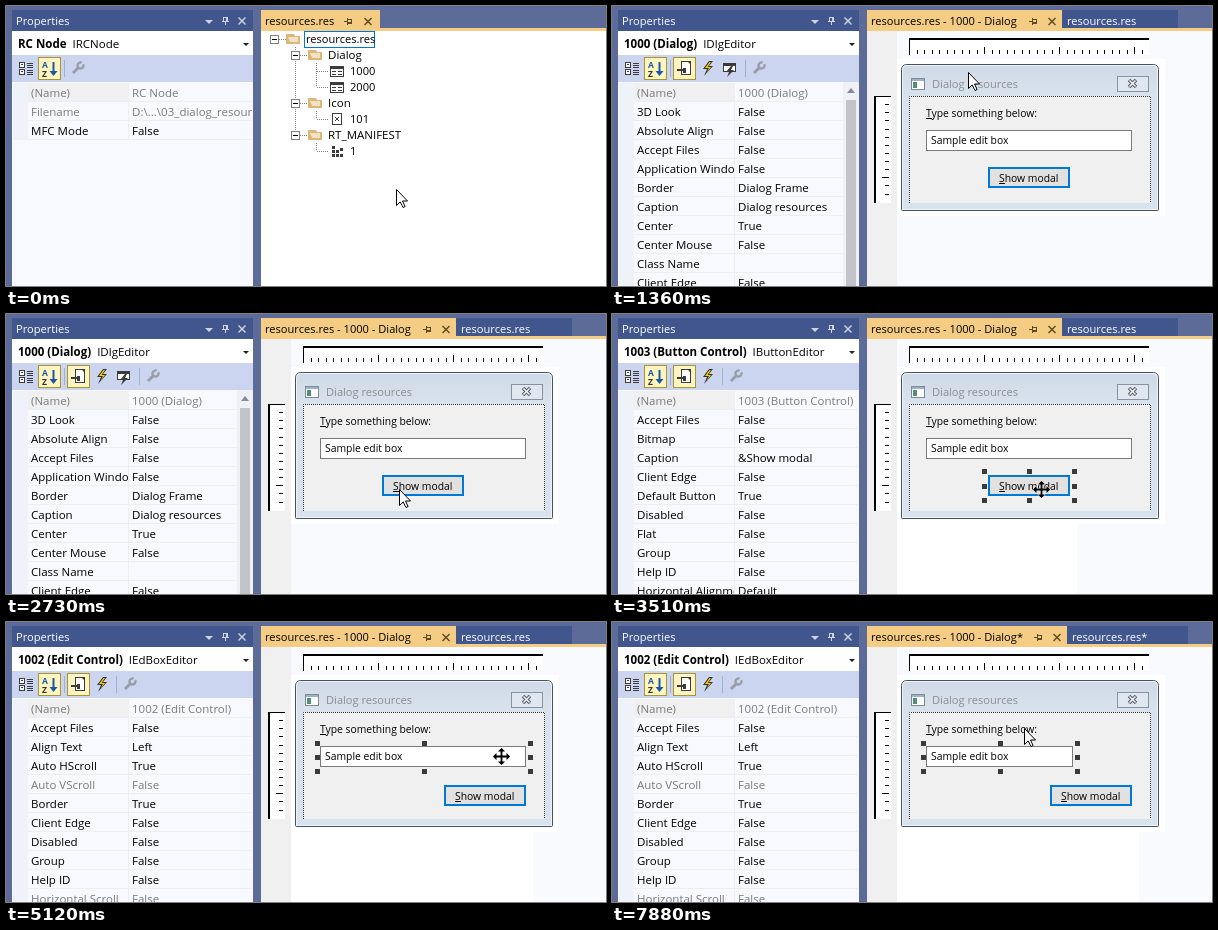
An HTML page with a canvas that plays this animation: 600 px wide and 280 px high, repeating every 8 s.

```html
<!DOCTYPE html>
<html lang="en">
<head>
<meta charset="utf-8">
<title>Dialog editor demo</title>
<style>
html, body { margin: 0; width: 100%; height: 100%; overflow: hidden; background: #5d6b99; }
canvas { display: block; }
</style>
</head>
<body>
<canvas id="stage" width="600" height="280"></canvas>
<script>
const ctx = document.getElementById('stage').getContext('2d');
const LOOP = 8000;
const UI = 11.5, TAB = 11.1, DLG = 10.35;
const BLUE = '#0078d7', NAVY = '#40568d', GOLD = '#f5cc84', DARK = '#3b3b3b';
const GRID = '#f7f9fe', GRID_LINE = '#eceef6', GUTTER = '#f0f2f9';

// Moments at which the interface state switches.
const PICK_NODE = 1090, OPEN_EDITOR = 1360, PICK_BUTTON = 2740, DROP_BUTTON = 4200;
const PICK_EDIT = 4900, AT_EDGE = 6510, DROP_EDGE = 7600;

const PANELS = {
  root: {
    name: 'RC Node', type: 'IRCNode', tools: 'short',
    rows: ['-(Name)|RC Node', '-Filename|D:\\...\\03_dialog_resources', 'MFC Mode|False']
  },
  node: {
    name: 'Dialog Node', type: 'IDlgRes', tools: 'short', wrench: '#333',
    rows: ['-(Name)|Dialog Node', '-Condition|', 'ID|1000', 'Language|English (United States)']
  },
  dialog: {
    name: '1000 (Dialog)', type: 'IDlgEditor', tools: 'full', scrolls: true,
    rows: ['-(Name)|1000 (Dialog)', '3D Look|False', 'Absolute Align|False', 'Accept Files|False',
      'Application Window|False', 'Border|Dialog Frame', 'Caption|Dialog resources', 'Center|True',
      'Center Mouse|False', 'Class Name|', 'Client Edge|False']
  },
  button: {
    name: '1003 (Button Control)', type: 'IButtonEditor', tools: 'events',
    rows: ['-(Name)|1003 (Button Control)', 'Accept Files|False', 'Bitmap|False', 'Caption|&Show modal',
      'Client Edge|False', 'Default Button|True', 'Disabled|False', 'Flat|False', 'Group|False',
      'Help ID|False', 'Horizontal Alignment|Default']
  },
  edit: {
    name: '1002 (Edit Control)', type: 'IEdBoxEditor', tools: 'events',
    rows: ['-(Name)|1002 (Edit Control)', 'Accept Files|False', 'Align Text|Left', 'Auto HScroll|True',
      '-Auto VScroll|False', 'Border|True', 'Client Edge|False', 'Disabled|False', 'Group|False',
      'Help ID|False', '-Horizontal Scroll|False']
  }
};

// Pointer moves: start, end, number of steps, destination.
const MOVES = [
  [270, 780, 5, 356, 66],
  [1640, 2210, 5, 393, 175],
  [2760, 3510, 7, 429, 175],
  [3780, 4160, 4, 491, 177],
  [4290, 4540, 3, 495, 143],
  [4810, 5060, 3, 495, 134],
  [5200, 5720, 5, 521, 136],
  [6380, 6380, 1, 521, 137],
  [6510, 6650, 2, 524, 136],
  [7090, 7480, 4, 465, 136],
  [7610, 7880, 3, 412, 106]
];

function stepped(t, start, end, steps) {
  if (t < start) return 0;
  if (t >= end) return 1;
  const p = (Math.floor((t - start) / (end - start) * (steps - 1)) + 1) / steps;
  return p * p * (3 - 2 * p);
}

function pointerAt(t) {
  let x = 390, y = 183;
  for (const [start, end, steps, toX, toY] of MOVES) {
    const p = stepped(t, start, end, steps);
    x += (toX - x) * p;
    y += (toY - y) * p;
  }
  return [Math.round(x), Math.round(y)];
}

function fill(x, y, w, h, color) {
  ctx.fillStyle = color;
  ctx.fillRect(x, y, w, h);
}

function box(x, y, w, h, color, border, width = 1) {
  fill(x, y, w, h, border);
  fill(x + width, y + width, w - 2 * width, h - 2 * width, color);
}

function text(str, x, y, color = '#000', size = UI, weight = 400) {
  ctx.font = `${weight} ${size}px "Open Sans", "Noto Sans", sans-serif`;
  ctx.fillStyle = color;
  ctx.fillText(str, x, y);
  return ctx.measureText(str).width;
}

function mnemonic(str, x, y) {
  text(str, x, y, '#000', DLG);
  fill(x, y + 1, Math.round(ctx.measureText(str[0]).width), 1, '#000');
}

function line(points, color, width = 1, dash = []) {
  ctx.beginPath();
  points.forEach(([x, y]) => ctx.lineTo(x, y));
  ctx.strokeStyle = color;
  ctx.lineWidth = width;
  ctx.setLineDash(dash);
  ctx.stroke();
  ctx.setLineDash([]);
}

function poly(points, color) {
  ctx.beginPath();
  points.forEach(([x, y]) => ctx.lineTo(x, y));
  ctx.closePath();
  ctx.fillStyle = color;
  ctx.fill();
}

function clipped(x, y, w, h, paint) {
  ctx.save();
  ctx.beginPath();
  ctx.rect(x, y, w, h);
  ctx.clip();
  paint();
  ctx.restore();
}

function cross(x, y, r, color, width = 1.4) {
  line([[x - r, y - r], [x + r, y + r]], color, width);
  line([[x - r, y + r], [x + r, y - r]], color, width);
}

function pin(x, y, color) {
  fill(x - 4, y, 3, 1, color);
  fill(x - 1, y - 3, 1, 7, color);
  fill(x, y - 2, 4, 1, color);
  fill(x, y + 1, 4, 2, color);
  fill(x + 3, y - 2, 1, 5, color);
}

function wrench(x, y, color) {
  line([[x - 5, y + 5], [x + 1, y - 1]], color, 3);
  ctx.beginPath();
  ctx.arc(x + 2.5, y - 2.5, 3, -0.4, 5.1);
  ctx.lineWidth = 2.4;
  ctx.stroke();
}

function toggled(x, w) {
  box(x, 51, w, 23, '#fdf4bf', '#a79432');
}

function drawTools(panel) {
  fill(6, 49, 241, 27, '#ccd5f0');
  for (const y of [56, 63]) {
    box(13, y, 6, 6, '#fff', DARK);
    fill(15, y + 2, 2, 1, DARK);
    for (let k = 0; k < 3; k++) fill(21, y + k * 2 + 1, 6, 1, DARK);
  }
  toggled(32, 23);
  text('A', 36, 62, '#1b58a8', 8.5, 700);
  text('Z', 36, 71, '#333', 8.5, 700);
  line([[47.5, 56], [47.5, 67]], '#1b58a8', 2);
  poly([[43.5, 65], [51.5, 65], [47.5, 70]], '#1b58a8');
  fill(58, 54, 1, 17, '#a3afd0');

  let wrenchX = 72;
  if (panel.tools !== 'short') {
    toggled(61, 23);
    box(69, 55, 10, 14, '#fff', DARK);
    poly([[75, 55], [79, 55], [79, 59]], DARK);
    line([[65, 64], [72, 64]], DARK, 2);
    fill(71, 62, 3, 5, DARK);
    poly([[97, 55], [91, 63], [95, 63], [92, 70], [101, 60], [97, 60], [101, 55]], '#333');
    poly([[97.5, 56], [93, 62], [97, 62], [94.5, 67], [99, 61], [95.5, 61], [99, 56]], '#ffcc00');
    wrenchX = 124;
    if (panel.tools === 'full') {
      box(111, 57, 13, 9, '#fff', DARK);
      fill(111, 57, 13, 3, DARK);
      poly([[119, 60], [114, 66], [117, 66], [115, 71], [122, 64], [119, 64], [121, 60]], DARK);
      wrenchX = 147;
    }
    fill(wrenchX - 14, 54, 1, 17, '#a3afd0');
  }
  wrench(wrenchX, 62, panel.wrench || '#9a9da8');
}

function drawPanel(panel) {
  fill(6, 4, 241, 276, '#fff');
  fill(6, 4, 241, 21, NAVY);
  text('Properties', 10, 19, '#fff', TAB);
  poly([[199, 14], [207, 14], [203, 18]], '#ced4dd');
  ctx.save();
  ctx.translate(219, 15);
  ctx.rotate(-Math.PI / 2);
  pin(0, 0, '#ced4dd');
  ctx.restore();
  cross(236, 15, 3.5, '#ced4dd');

  const nameWidth = text(panel.name, 12, 42, '#000', UI, 700);
  text(panel.type, 12 + nameWidth + 6, 42);
  poly([[237, 37], [243, 37], [240, 40]], '#1e1e1e');
  drawTools(panel);

  const right = panel.scrolls ? 231 : 246;
  fill(6, 76, 241, 204, GRID);
  fill(7, 77, 15, panel.rows.length * 19, GUTTER);
  fill(22, 77, 100, 18, '#f0f0f0');
  panel.rows.forEach((row, i) => {
    const muted = row[0] === '-';
    const [label, value] = row.slice(muted ? 1 : 0).split('|');
    const y = 77 + i * 19, color = muted ? '#7b7b80' : '#000';
    clipped(22, y, 100, 19, () => text(label, 25, y + 14, color));
    clipped(123, y, right - 123, 19, () => text(value, 126, y + 14, color));
    fill(22, y + 18, right - 22, 1, GRID_LINE);
    fill(122, y, 1, 19, GRID_LINE);
  });
  if (panel.scrolls) {
    fill(231, 76, 16, 204, '#f0f1f6');
    poly([[235, 87], [243, 87], [239, 82]], '#868999');
    fill(234, 94, 10, 186, '#c2c3c9');
  }
}

function drawTab(x, w, label, active, pinX, closeX) {
  fill(x, 4, w, 20, active ? GOLD : NAVY);
  text(label, x + (active ? 4 : 5), 19, active ? '#000' : '#fff', TAB);
  if (active) {
    pin(pinX, 15, '#5c4a22');
    cross(closeX, 15.5, 3.5, '#5c4a22');
  }
}

function folder(x, y) {
  poly([[x - 7, y - 5], [x + 1, y - 5], [x + 2, y - 3], [x + 7, y - 3], [x + 7, y + 5], [x - 7, y + 5]], '#dcb67a');
  poly([[x - 5, y - 2], [x + 5, y - 2], [x + 5, y + 3], [x - 3, y + 3]], '#f3e2c2');
}

function expander(x, y) {
  box(x - 4, y - 4, 9, 9, '#fff', '#7f7f7f');
  fill(x - 2, y, 5, 1, '#000');
}

function dialogIcon(x, y) {
  box(x - 7, y - 5, 14, 11, '#fff', DARK);
  fill(x - 7, y - 5, 14, 3, DARK);
  for (const dy of [0, 3]) {
    fill(x - 5, y + dy, 4, 1, DARK);
    fill(x + 1, y + dy, 4, 1, DARK);
  }
}

function drawTree(selected) {
  fill(255, 24, 345, 256, '#fff');
  const dotted = points => line(points, '#808080', 1, [1, 1]);
  dotted([[273, 33.5], [280, 33.5]]);
  dotted([[289.5, 41], [289.5, 129]]);
  for (const y of [49, 97, 129]) dotted([[294, y + .5], [302, y + .5]]);
  for (const [top, bottom] of [[57, 81], [105, 113], [137, 145]]) {
    dotted([[310.5, top], [310.5, bottom]]);
    dotted([[311, bottom + .5], [323, bottom + .5]]);
  }
  dotted([[311, 65.5], [323, 65.5]]);

  expander(268, 33);
  folder(287, 33);
  if (!selected) box(298, 25, 71, 17, '#fff', BLUE);
  text('resources.res', 300, 37, '#000', TAB);
  [['Dialog', 49], ['Icon', 97], ['RT_MANIFEST', 129]].forEach(([label, y]) => {
    expander(289, y);
    folder(309, y);
    text(label, 322, y + 4);
  });

  dialogIcon(331, 65);
  dialogIcon(331, 81);
  if (selected) fill(341, 57, 31, 16, BLUE);
  text('1000', 344, 69, selected ? '#fff' : '#000', TAB);
  text('2000', 344, 85, '#000', TAB);
  box(326, 107, 10, 12, '#fff', DARK);
  cross(331, 113, 2, DARK, 1);
  text('101', 344, 117, '#000', TAB);
  for (const [dx, dy] of [[-5, -5], [-5, -1], [-5, 3], [-1, -1], [-1, 3], [3, 3], [3, -3]]) {
    fill(331 + dx, 145 + dy, 3, 3, DARK);
  }
  text('1', 344, 149, '#000', TAB);
}

function drawRulers() {
  fill(297, 32, 240, 17, '#fff');
  fill(297, 32, 240, 2, '#000');
  fill(297, 32, 1, 17, '#000');
  for (let i = 1; i < 32; i++) {
    const h = i % 10 ? 4 : 7;
    fill(Math.round(297 + i * 7.5), 48 - h, 1, h, '#000');
  }
  fill(262, 90, 17, 107, '#fff');
  fill(262, 90, 2, 107, '#000');
  fill(262, 90, 17, 1, '#000');
  for (let i = 1; i < 13; i++) {
    const w = i % 10 ? 4 : 7;
    fill(277 - w, Math.round(90 + i * 8.125), w, 1, '#000');
  }
}

function drawHandles(x, y, w, h) {
  const spread = (low, high) => [low, Math.round((low + high) / 2), high];
  spread(x - 6, x + w + 2).forEach((hx, i) => spread(y - 6, y + h + 2).forEach((hy, j) => {
    if (i !== 1 || j !== 1) fill(hx, hy, 5, 5, DARK);
  }));
}

function drawFrame() {
  const frame = ctx.createLinearGradient(0, 59, 0, 91);
  frame.addColorStop(0, '#cfdae6');
  frame.addColorStop(1, '#d9e3ee');
  ctx.beginPath();
  ctx.roundRect(289.5, 58.5, 257, 146, [5, 5, 1, 1]);
  ctx.fillStyle = frame;
  ctx.fill();
  ctx.lineWidth = 1;
  ctx.strokeStyle = '#46525f';
  ctx.stroke();
  ctx.beginPath();
  ctx.roundRect(290.5, 59.5, 255, 144, [4, 4, 0, 0]);
  ctx.strokeStyle = '#eef4fa';
  ctx.stroke();

  box(299, 72, 14, 12, '#fff', '#7c8b96');
  fill(300, 73, 12, 2, '#9db3c7');
  fill(301, 76, 4, 6, '#4f8f76');
  text('Dialog resources', 320, 82, '#8b8e93', TAB);
  box(505, 70, 32, 16, '#dfe8f1', '#87929e');
  cross(520.5, 77.5, 3.5, '#555f6b', 3.6);
  cross(520.5, 77.5, 3, '#fff', 1.4);

  fill(297, 90, 242, 107, '#f0f0f0');
  line([[297.5, 197], [297.5, 90.5], [538.5, 90.5], [538.5, 197]], '#333', 1, [1, 1]);
}

function drawDialog(t) {
  const drag = stepped(t, 3780, 4160, 4), shrink = stepped(t, 7090, 7480, 4);
  const bx = Math.round(376 + 62 * drag), by = Math.round(161 + 2 * drag);
  const editW = Math.round(206 - 59 * shrink);

  fill(285, 53, 268, 157, '#fff');
  if (t >= PICK_BUTTON) fill(285, 210, bx + 89 - 285, 70, '#fff');
  drawFrame();
  mnemonic('Type something below:', 314, 111);
  box(314, 124, editW, 21, '#fff', '#7a7a7a');
  text('Sample edit box', 319, 138, '#000', DLG);
  box(bx, by, 82, 21, '#e1e1e1', BLUE, 2);
  mnemonic('Show modal', bx + 11, by + 15);

  if (t >= PICK_EDIT) drawHandles(315, 125, editW - 1, 20);
  else if (t >= PICK_BUTTON) drawHandles(bx, by, 82, 21);
}

function drawEditor(t) {
  const dirty = t >= DROP_EDGE, mark = dirty ? '*' : '';
  const split = dirty ? 455 : 450, end = dirty ? 576 : 566;
  fill(255, 24, 345, 256, '#f9fafd');
  fill(255, 24, 30, 256, '#f0f0f0');
  drawTab(255, split - 255, 'resources.res - 1000 - Dialog' + mark, true, split - 29, split - 10);
  drawTab(split, end - split, 'resources.res' + mark, false);
  drawRulers();
  drawDialog(t);
}

function outlined(points, inside, outside) {
  poly(points, inside);
  ctx.strokeStyle = outside;
  ctx.lineWidth = 1;
  ctx.stroke();
}

function arrowHeads(directions, reach) {
  const shapes = directions.map(([dx, dy]) => {
    const at = (along, side) => [dx * along - dy * side, dy * along + dx * side];
    const neck = reach - 3.5;
    return [at(reach, 0), at(neck, 3.5), at(neck, .9), at(0, .9), at(0, -.9), at(neck, -.9), at(neck, -3.5)];
  });
  shapes.forEach(shape => outlined(shape, '#000', '#fff'));
  shapes.forEach(shape => poly(shape, '#000'));
}

function drawPointer(t) {
  const [x, y] = pointerAt(t);
  const moving = (t >= PICK_BUTTON && t < DROP_BUTTON) || (t >= PICK_EDIT && t < AT_EDGE);
  const sizing = t >= AT_EDGE && t < DROP_EDGE;
  ctx.save();
  ctx.translate(x + .5, y + .5);
  if (moving) {
    arrowHeads([[1, 0], [-1, 0], [0, 1], [0, -1]], 8.5);
  } else if (sizing) {
    arrowHeads([[1, 0], [-1, 0]], 9);
  } else {
    outlined([[0, 0], [0, 16], [3.7, 12.4], [6.5, 18], [8.6, 17], [6, 11.5], [11, 11.5]], '#fff', '#000');
  }
  ctx.restore();
}

function panelAt(t) {
  if (t < PICK_NODE) return PANELS.root;
  if (t < OPEN_EDITOR) return PANELS.node;
  if (t < PICK_BUTTON) return PANELS.dialog;
  return t < PICK_EDIT ? PANELS.button : PANELS.edit;
}

function draw(t) {
  fill(0, 0, 600, 280, '#5d6b99');
  drawPanel(panelAt(t));
  if (t < OPEN_EDITOR) {
    drawTab(255, 119, 'resources.res', true, 342, 362);
    drawTree(t >= PICK_NODE);
  } else {
    drawEditor(t);
  }
  fill(255, 22, 345, 3, GOLD);
  drawPointer(t);
}

const began = performance.now();
function tick() {
  draw((performance.now() - began) % LOOP);
  requestAnimationFrame(tick);
}
tick();
</script>
</body>
</html>
```
